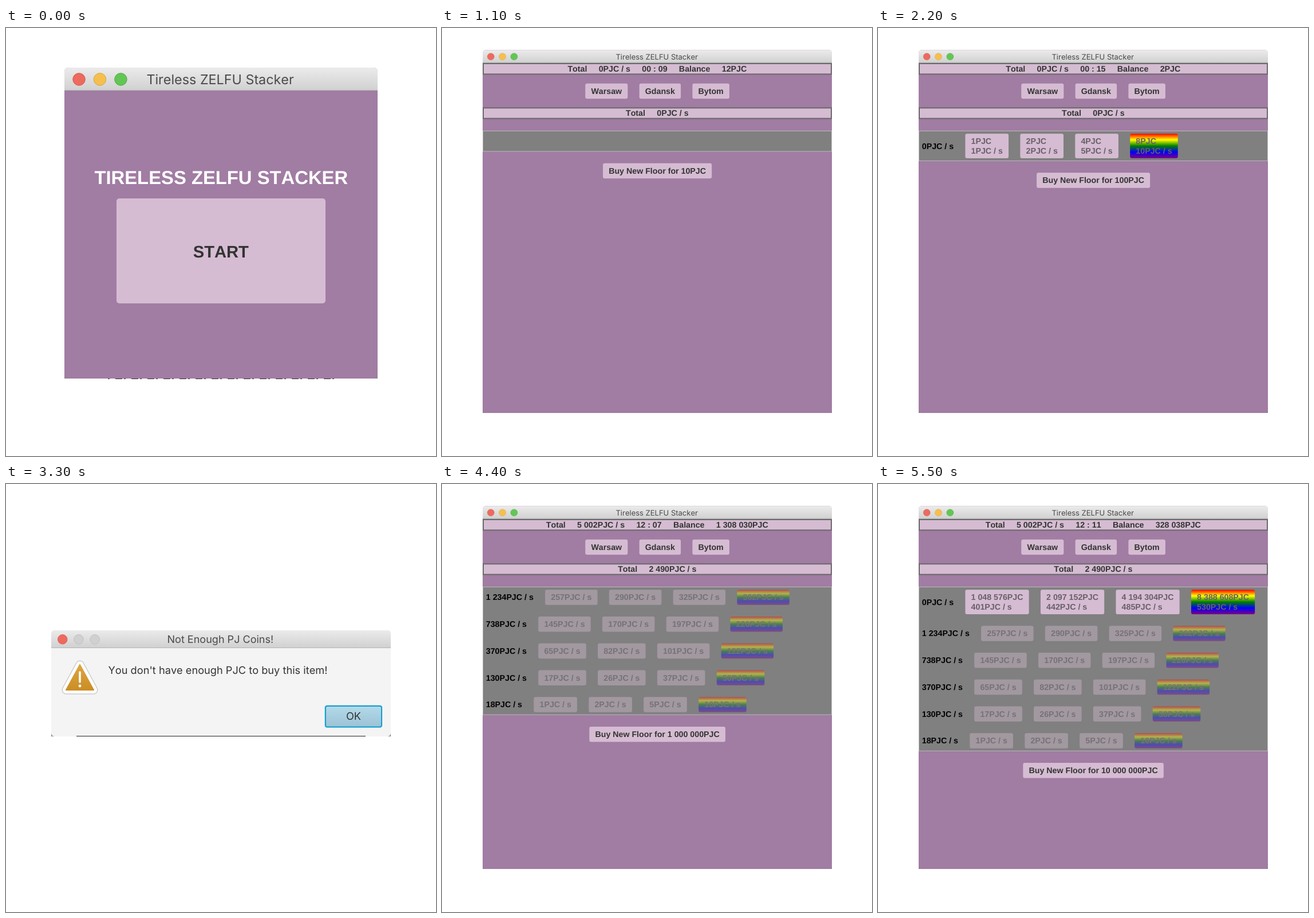
Write an HTML page that moves like this. It is 751x746 px and loops after 6.6 s.

```html
<!DOCTYPE html>
<html lang="en">
<head>
<meta charset="utf-8">
<title>Builder game</title>
<style>
  html, body { margin: 0; width: 100%; height: 100%; overflow: hidden; background: #fff; }
  svg { display: block; width: 100%; height: 100%; }
  text { font-kerning: none; text-rendering: geometricPrecision; white-space: pre; }
  .game { font-family: "Liberation Sans", Arial, sans-serif; font-weight: bold; }
  .system { font-family: Inter, sans-serif; }
</style>
</head>
<body>
<svg id="stage" viewBox="0 0 751 746">
  <defs>
    <linearGradient id="bar" x2="0" y2="1"><stop stop-color="#ebebeb"/><stop offset="1" stop-color="#d0d0d0"/></linearGradient>
    <linearGradient id="amber" x2="0" y2="1"><stop stop-color="#dea440"/><stop offset="1" stop-color="#cb8e25"/></linearGradient>
    <linearGradient id="focus" x2="0" y2="1"><stop stop-color="#b4dae9"/><stop offset="1" stop-color="#9bc3d6"/></linearGradient>
    <linearGradient id="rainbow" x2="0" y2="1">
      <stop stop-color="red"/><stop offset=".25" stop-color="yellow"/><stop offset=".5" stop-color="green"/>
      <stop offset=".75" stop-color="blue"/><stop offset="1" stop-color="purple"/>
    </linearGradient>
  </defs>
</svg>
<script>
const SCENE_MS = 1100;
const GAME_NAME = 'Tireless ZELFU Stacker';
const PURPLE = '#a17ca3', PINK = '#d5bcd2', DARK = '#333', MUTED = '#685f68';
const FONT = 14.22, GAP = 20.3, PAD = 10.15, LINE = 16.3;
const MID = 375.8;

const ruler = document.createElement('canvas').getContext('2d');
ruler.font = `bold ${FONT}px "Liberation Sans", Arial, sans-serif`;
ruler.fontKerning = 'none';
const widthOf = text => ruler.measureText(text).width;

const rect = (x, y, w, h, fill, extra = '') =>
  `<rect x="${x}" y="${y}" width="${w}" height="${h}" fill="${fill}" ${extra}/>`;
const text = (content, x, y, size = FONT, fill = DARK, anchor = 'start', font = 'game') =>
  `<text class="${font}" x="${x}" y="${y}" font-size="${size}" fill="${fill}" text-anchor="${anchor}">${content}</text>`;

function windowFrame(x, y, w, h, scale, title, body, active = true) {
  const barHeight = 22 * scale, r = 5 * scale ** .5;
  const colors = active
    ? [['#ed6a5e', '#d55449'], ['#f5bf4f', '#d8a13c'], ['#62c655', '#4aa83f']]
    : [['#ed6a5e', '#d55449'], ['#d0d0d0', '#b8b8b8'], ['#d0d0d0', '#b8b8b8']];
  const lights = colors.map(([fill, edge], i) =>
    `<circle cx="${x + (14 + 20 * i) * scale}" cy="${y + 11.2 * scale}" r="${5.9 * scale}" fill="${fill}" stroke="${edge}" stroke-width="${.5 * scale}"/>`);
  return rect(x, y + h - r, w, r, '#888')
    + rect(x, y, w, h, body, `rx="${r}"`)
    + `<path d="M${x} ${y + barHeight}v${r - barHeight}q0 ${-r} ${r} ${-r}h${w - 2 * r}q${r} 0 ${r} ${r}v${barHeight - r}z" fill="url(#bar)"/>`
    + rect(x, y + barHeight - 1, w, 1, '#b4b4b4')
    + lights.join('')
    + text(title, x + w / 2 - .8 * scale, y + 15.8 * scale, 12.8 * scale, '#4a4a4a', 'middle', 'system');
}

function button(lines, x, y, fill = PINK, color = DARK) {
  const w = Math.max(...lines.map(widthOf)) + 2 * PAD;
  const h = PAD + LINE * lines.length;
  return {
    w, h,
    svg: rect(x, y, w, h, fill, 'rx="3"')
      + lines.map((line, i) => text(line, x + PAD, y + 18.2 + LINE * i, FONT, color)).join('')
  };
}

function centeredButtons(labels, y) {
  const widths = labels.map(label => widthOf(label) + 2 * PAD);
  let x = MID + .3 - (widths.reduce((a, b) => a + b) + GAP * (labels.length - 1)) / 2;
  return labels.map((label, i) => {
    const part = button([label], x, y).svg;
    x += widths[i] + GAP;
    return part;
  }).join('');
}

function infoBar(y, items) {
  const spans = items.map((item, i) => `<tspan dx="${i ? GAP : 0}">${item}</tspan>`).join('');
  return rect(72, y + 1, 608, 18.4, PINK, 'stroke="#696969" stroke-width="2"')
    + text(spans, MID, y + 15, FONT, DARK, 'middle');
}

const group = n => String(n).replace(/\B(?=(\d{3})+$)/g, ' ');
const coins = n => group(n) + 'PJC';
const perSecond = n => coins(n) + ' / s';
const rate = item => item * item + 1;

// A floor holds four items; an open floor still offers them with their prices.
function floorRow(floor, open, y) {
  const items = [0, 1, 2, 3].map(i => floor * 4 + i);
  const income = open ? 0 : items.reduce((sum, item) => sum + rate(item), 0);
  const label = perSecond(income);
  let x = 76.8 + widthOf(label) + GAP, h = 0, parts = '';
  items.forEach((item, i) => {
    const lines = open ? [coins(2 ** item), perSecond(rate(item))] : [perSecond(rate(item))];
    const part = button(lines, x, y, i === 3 ? 'url(#rainbow)' : PINK, MUTED);
    parts += part.svg;
    x += part.w + GAP;
    h = part.h;
  });
  return {
    h,
    svg: text(label, 76.8, y + h / 2 + 5, FONT, '#000') + `<g opacity="${open ? 1 : .4}">${parts}</g>`
  };
}

function gameScene({ total, clock, balance, cityTotal, floors, topOpen }) {
  let y = 184.2, rows = '';
  for (let floor = floors - 1; floor >= 0; floor--) {
    const row = floorRow(floor, topOpen && floor === floors - 1, y);
    rows += row.svg;
    y += row.h + GAP;
  }
  const bottom = floors ? y - GAP + 5 : 215.5;
  return windowFrame(71, 38.5, 610, 632.5, 1.016, GAME_NAME, PURPLE)
    + infoBar(61, ['Total', perSecond(total), clock, 'Balance', coins(balance)])
    + centeredButtons(['Warsaw', 'Gdansk', 'Bytom'], 96.7)
    + infoBar(138.3, ['Total', perSecond(cityTotal)])
    + rect(71.5, 179.5, 609, bottom - 180, '#808080', 'stroke="#b9b9b9"')
    + rows
    + centeredButtons([`Buy New Floor for ${coins(10 ** (floors + 1))}`], bottom + GAP);
}

function startScene() {
  return windowFrame(102, 69, 547, 542, 1.823, GAME_NAME, PURPLE)
    + '<path d="M178 611.5H573" stroke="#333" stroke-dasharray="3 10 12 3"/>'
    + text(GAME_NAME.toUpperCase(), MID, 272, 32.8, '#fff', 'middle')
    + rect(193, 297, 365, 183, PINK, 'rx="5"')
    + text('START', 375.3, 399.7, 29.17, DARK, 'middle');
}

function warningScene() {
  const triangle = 'M129 315L153 359H105z';
  const outline = (color, width) =>
    `<path d="${triangle}" fill="${color}" stroke="${color}" stroke-width="${width}" stroke-linejoin="round"/>`;
  return windowFrame(79, 255, 593, 185, 1.41, 'Not Enough PJ Coins!', '#f4f4f4', false)
    + '<path d="M123 439.5H628" stroke="#222"/>'
    + outline('#c4c4c4', 15) + outline('#fff', 12.5) + outline('url(#amber)', 2)
    + '<path d="M129 328V345" stroke="#fff" stroke-width="3.6" stroke-linecap="round"/><circle cx="129" cy="352" r="2.4" fill="#fff"/>'
    + text("You don't have enough PJC to buy this item!", 178.5, 330.5, 18.2, DARK, 'start', 'system')
    + rect(556, 385, 101.5, 40, '#c3e3ef', 'rx="5"')
    + rect(558, 387, 98, 36.5, 'url(#focus)', 'rx="3" stroke="#129fd0" stroke-width="2"')
    + text('OK', 607, 411.3, 18.2, DARK, 'middle', 'system');
}

const scenes = [
  startScene(),
  gameScene({ total: 0, clock: '00 : 09', balance: 12, cityTotal: 0, floors: 0 }),
  gameScene({ total: 0, clock: '00 : 15', balance: 2, cityTotal: 0, floors: 1, topOpen: true }),
  warningScene(),
  gameScene({ total: 5002, clock: '12 : 07', balance: 1308030, cityTotal: 2490, floors: 5 }),
  gameScene({ total: 5002, clock: '12 : 11', balance: 328038, cityTotal: 2490, floors: 6, topOpen: true })
];

const stage = document.getElementById('stage');
stage.insertAdjacentHTML('beforeend', scenes.map(scene => `<g class="scene" display="none">${scene}</g>`).join(''));
const layers = stage.querySelectorAll('.scene');

function draw() {
  const current = Math.floor(performance.now() / SCENE_MS) % layers.length;
  layers.forEach((layer, i) => layer.setAttribute('display', i === current ? 'inline' : 'none'));
  requestAnimationFrame(draw);
}
draw();
</script>
</body>
</html>
```
